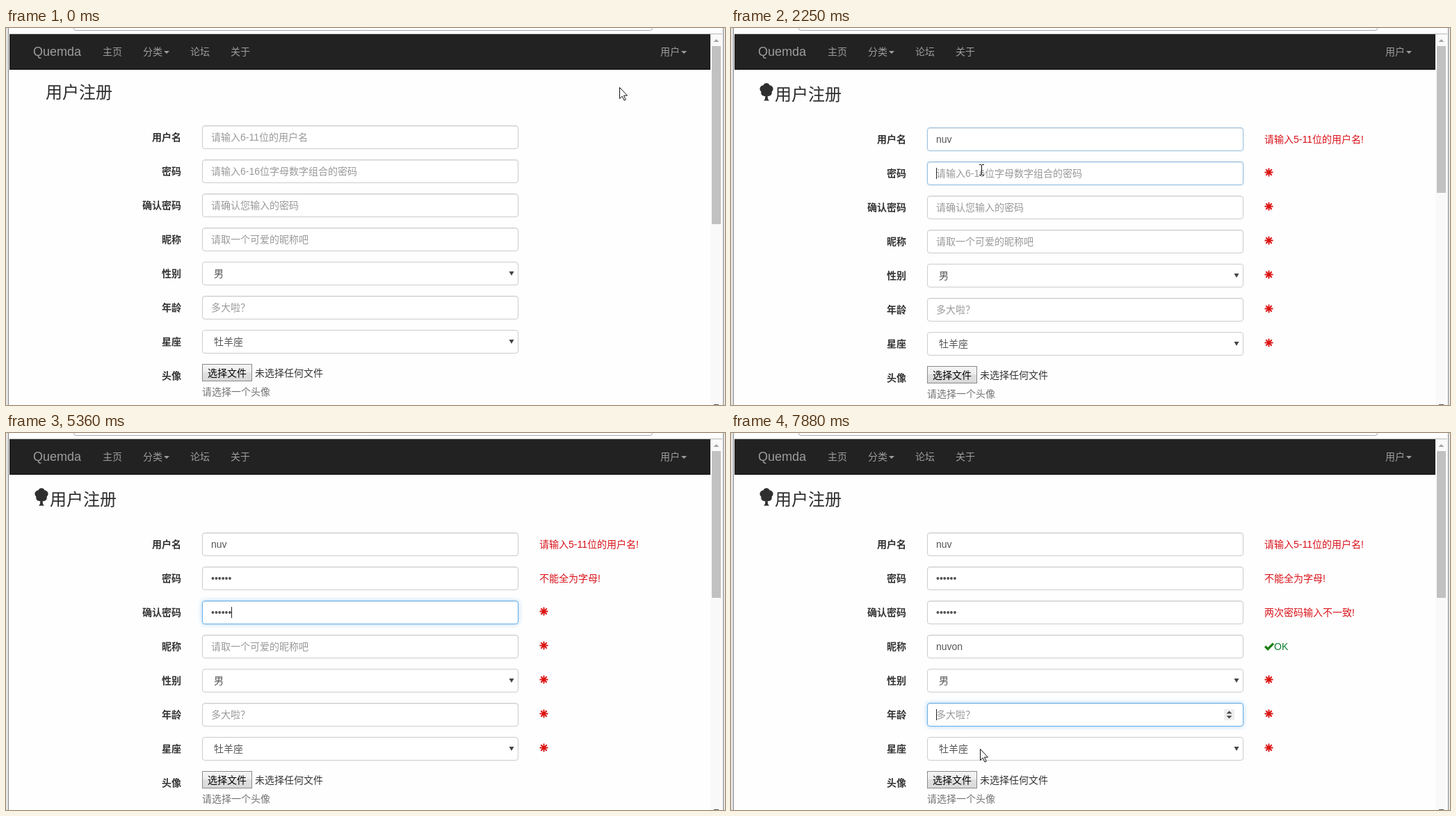
An HTML page with a canvas that plays this animation: 1034x542 px, repeating every 8000 ms.

```html
<!DOCTYPE html>
<html lang="zh-CN">
<head>
<meta charset="utf-8">
<title>用户注册</title>
<style>
html, body { margin: 0; width: 100%; height: 100%; overflow: hidden; background: #fefefe; }
#stage { position: absolute; left: 0; top: 0; width: 1034px; height: 542px; overflow: hidden;
  font: 14px/20px "Liberation Sans", Arial, "Noto Sans CJK SC", "Noto Sans CJK", sans-serif; color: #333; }
#stage div { position: absolute; box-sizing: border-box; white-space: pre; }
canvas { position: absolute; left: 0; top: 0; }
.nav { color: #9d9d9d; top: 24px; }
.label { right: 782px; font-weight: bold; }
.field { left: 282px; width: 455px; height: 34px; border: 1px solid #ccc; border-radius: 4px;
  padding: 6px 12px; background: #fff; color: #555; }
.select { padding-left: 16px; }
.msg { left: 767px; color: #d9121a; }
#title { font-size: 24px; line-height: 26px; color: #2b2b2b; }
#button { left: 282px; width: 72px; height: 25px; border: 1px solid #8a8a8a; color: #000; padding: 2px 7px;
  background: linear-gradient(#f4f4f4, #ececec 50%, #e0e0e0 50%, #d9d9d9); }
</style>
</head>
<body>
<div id="stage"></div>
<script>
const LOOP = 8000, W = 1034, H = 542, PITCH = 49, LEFT = 282, RIGHT = 737;
const TICK = 141.4, LEAD = 50, FADE = 130, BLINK = 500;
const stage = document.getElementById('stage');
const clamp = v => Math.min(1, Math.max(0, v));

function add(cls, text, style = {}) {
  const el = document.createElement('div');
  el.className = cls;
  el.textContent = text;
  Object.assign(el.style, style);
  stage.append(el);
  return el;
}
function layer() {
  const c = document.createElement('canvas');
  c.width = W;
  c.height = H;
  stage.append(c);
  return c.getContext('2d');
}
function rect(g, color, x, y, w, h) {
  g.fillStyle = color;
  g.fillRect(x, y, w, h);
}
function poly(g, color, pts) {
  g.beginPath();
  pts.forEach(([x, y]) => g.lineTo(x, y));
  g.closePath();
  g.fillStyle = color;
  g.fill();
}
// Triangle with its base at y; negative h points up.
const tri = (g, color, x, y, half, h) => poly(g, color, [[x - half, y], [x + half, y], [x, y + h]]);

// Visited fields gain focus at enter, are typed into from type, and are checked at leave.
const dots = '•'.repeat(6);
const rows = [
  { label: '用户名', hint: '请输入6-11位的用户名', text: 'nuv',
    enter: 660, type: 1600, leave: 2140, msg: '请输入5-11位的用户名!' },
  { label: '密码', hint: '请输入6-16位字母数字组合的密码', text: dots,
    enter: 2140, type: 3300, leave: 3850, msg: '不能全为字母!' },
  { label: '确认密码', hint: '请确认您输入的密码', text: dots,
    enter: 4570, type: 5150, leave: 5850, msg: '两次密码输入不一致!' },
  { label: '昵称', hint: '请取一个可爱的昵称吧', text: 'nuvon',
    enter: 5850, type: 6150, leave: 6820, msg: 'OK', ok: true },
  { label: '性别', choice: '男' },
  { label: '年龄', hint: '多大啦？', enter: 6820 },
  { label: '星座', choice: '牡羊座' }
];

// Pointer moves: start, end, then the place reached.
const home = [882, 85];
const moves = [
  [140, 657, 345, 156], [940, 1222, 361, 160], [1790, 2212, 360, 204],
  [2640, 2900, 360, 207], [3480, 4040, 360, 240], [4330, 4475, 360, 258],
  [5450, 6030, 355, 316], [6300, 7445, 347, 453], [7590, 7868, 358, 454]
];

const back = layer();
add('nav', 'Quemda', { left: '39px', fontSize: '18px' });
[['主页', 139], ['分类', 197], ['论坛', 265], ['关于', 323], ['用户', 941]]
  .forEach(([s, x]) => add('nav', s, { left: x + 'px' }));
const title = add('', '用户注册');
title.id = 'title';
for (const r of rows) {
  r.name = add('label', r.label);
  r.box = add(r.choice ? 'field select' : 'field', r.choice || r.hint);
  if (r.msg) r.note = add('msg', r.msg, r.ok ? { left: '781px', color: '#0b7d2e' } : {});
}
const avatar = add('label', '头像');
const button = add('', '选择文件');
button.id = 'button';
const noFile = add('', '未选择任何文件', { left: '358px' });
const help = add('', '请选择一个头像', { left: LEFT + 'px', color: '#737373' });
const front = layer();
front.font = '14px "Liberation Sans", Arial, sans-serif';

function drawWindow(g, late) {
  rect(g, '#fefefe', 0, 0, W, H);
  g.strokeStyle = '#a9a9a9';
  g.lineWidth = 1;
  g.beginPath();
  g.roundRect(97.5, -20.5, 832, 24, 3);
  g.stroke();
  rect(g, '#b8b8b8', 5, 8, 1025, 1);
  rect(g, '#e6e6e6', 0, 0, 3, H);
  rect(g, '#858585', 3, 0, 1, H);
  rect(g, '#222', 5, 9, 1008, 51);
  rect(g, '#080808', 5, 59, 1008, 1);
  for (const x of [231, 975]) tri(g, '#9d9d9d', x, 33, 4, 4);
  rect(g, '#f9f9f9', 1013, 9, 17, 533);
  rect(g, '#c1c1c1', 1015, 26, 13, late ? 211 : 256);
  tri(g, '#a3a3a3', 1021.5, 20, 4, -4);
  rect(g, '#505050', 1018, 541, 7, 1);
  rect(g, '#8c8c8c', 1031, 0, 1, H);
  rect(g, '#e4e4e4', 1032, 0, 2, H);
}

function drawTree(g) {
  g.fillStyle = '#2f2f2f';
  for (let k = 0; k < 5; k++) {
    const a = (k * .4 - .5) * Math.PI;
    g.beginPath();
    g.arc(51 + 4.8 * Math.cos(a), 89 + 4.8 * Math.sin(a), 5, 0, 7);
    g.fill();
  }
  poly(g, '#2f2f2f', [[49.5, 95], [52.5, 95], [53, 102], [55, 104.5], [47, 104.5], [49, 102]]);
}

function drawStar(g, x, y) {
  g.strokeStyle = '#dc1414';
  g.lineWidth = 1.9;
  g.beginPath();
  for (let k = 0; k < 4; k++) {
    const c = 6 * Math.cos(k * Math.PI / 4), s = 6 * Math.sin(k * Math.PI / 4);
    g.moveTo(x - c, y - s);
    g.lineTo(x + c, y + s);
  }
  g.stroke();
}

function drawTick(g, x, y) {
  g.strokeStyle = '#1b7f12';
  g.lineWidth = 3.4;
  g.beginPath();
  g.moveTo(x + 1.2, y + 5.8);
  g.lineTo(x + 5, y + 9.6);
  g.lineTo(x + 13, y + 1.6);
  g.stroke();
}

function drawSpinner(g, y) {
  rect(g, '#eee', 709, y + 9, 15, 16);
  tri(g, '#444', 716.5, y + 15.5, 4, -4);
  tri(g, '#444', 716.5, y + 18.5, 4, 4);
}

function drawBeam(g, x, y) {
  rect(g, '#111', x, y - 7, 1, 14);
  for (const e of [-8, 7]) {
    rect(g, '#111', x - 3, y + e, 3, 1);
    rect(g, '#111', x + 1, y + e, 3, 1);
  }
}

function drawArrow(g, x, y) {
  const pts = [[0, 0], [0, 16], [3.7, 12.6], [6.5, 18.5], [8.7, 17.5], [6, 11.6], [11, 11.6]];
  poly(g, '#fff', pts.map(([a, b]) => [x + a + .5, y + b + .5]));
  g.strokeStyle = '#111';
  g.lineWidth = 1;
  g.stroke();
}

function pointerAt(t) {
  let [x, y] = home, since = 0;
  for (const [from, to, nx, ny] of moves) {
    if (t < from) break;
    const k = clamp((t - from) / (to - from));
    x += (nx - x) * k;
    y += (ny - y) * k;
    since = from;
  }
  // Typing hides the pointer until it next moves.
  const hidden = rows.some(r => r.type > since && r.type <= t);
  return { x: Math.round(x), y: Math.round(y), hidden };
}

const typed = (r, t) => r.text ? r.text.slice(0, Math.ceil(r.text.length * clamp((t - r.type) / FADE))) : '';
const focus = (r, t) => clamp((t - r.enter) / FADE) - (r.leave ? clamp((t - r.leave) / FADE) : 0);
const mix = (a, b, k) => `rgb(${a.map((v, i) => Math.round(v + (b[i] - v) * k))})`;
const put = (el, y) => { el.style.top = y + 'px'; };

function drawInput(g, r, y, t) {
  const text = typed(r, t), k = focus(r, t), s = r.box.style;
  r.box.textContent = text || r.hint;
  s.color = text ? '#555' : '#999';
  s.borderColor = mix([204, 204, 204], [102, 175, 233], k);
  s.boxShadow = `inset 0 1px 1px rgba(0,0,0,.075), 0 0 ${6 * k}px rgba(102,175,233,${.55 * k})`;
  const active = t >= r.enter && !(t >= r.leave);
  const since = t - (text ? r.type : r.enter);
  if (active && since % (2 * BLINK) < BLINK) {
    rect(g, '#222', LEFT + 13 + Math.round(g.measureText(text).width), y + 9, 1, 16);
  }
}

function render(t) {
  const late = t >= 200, top = late ? 143 : 140, g = front;
  const p = pointerAt(t);
  let over = null;
  drawWindow(back, late);
  g.clearRect(0, 0, W, H);
  put(title, top - 60);
  title.style.left = late ? '63px' : '57px';
  if (late) drawTree(g);

  rows.forEach((r, i) => {
    const y = top + i * PITCH, told = r.msg && t >= r.leave;
    put(r.name, y + 7);
    put(r.box, y);
    if (p.x > LEFT && p.x < RIGHT && p.y >= y && p.y < y + 34) over = r;
    if (r.choice) tri(g, '#444', 727, y + 14, 3.5, 6);
    else drawInput(g, r, y, t);
    if (r.note) {
      put(r.note, y + 7);
      r.note.style.visibility = told ? 'visible' : 'hidden';
    }
    if (told && r.ok) drawTick(g, 767, y + 11);
    if (late && !told) drawStar(g, 773.5, y + 15.5);
  });

  const base = top + rows.length * PITCH, age = rows[5];
  put(avatar, base + 7);
  put(button, base);
  put(noFile, base + 3);
  put(help, base + 30);
  if (over === age || t >= age.enter) drawSpinner(g, top + 5 * PITCH);
  if (!p.hidden) (over && !over.choice ? drawBeam : drawArrow)(g, p.x, p.y);
}

// The picture advances in even steps, like a screen recording.
function tick() {
  const t = performance.now() % LOOP;
  render(Math.floor((t + LEAD) / TICK) * TICK - LEAD);
  requestAnimationFrame(tick);
}
tick();
</script>
</body>
</html>
```
